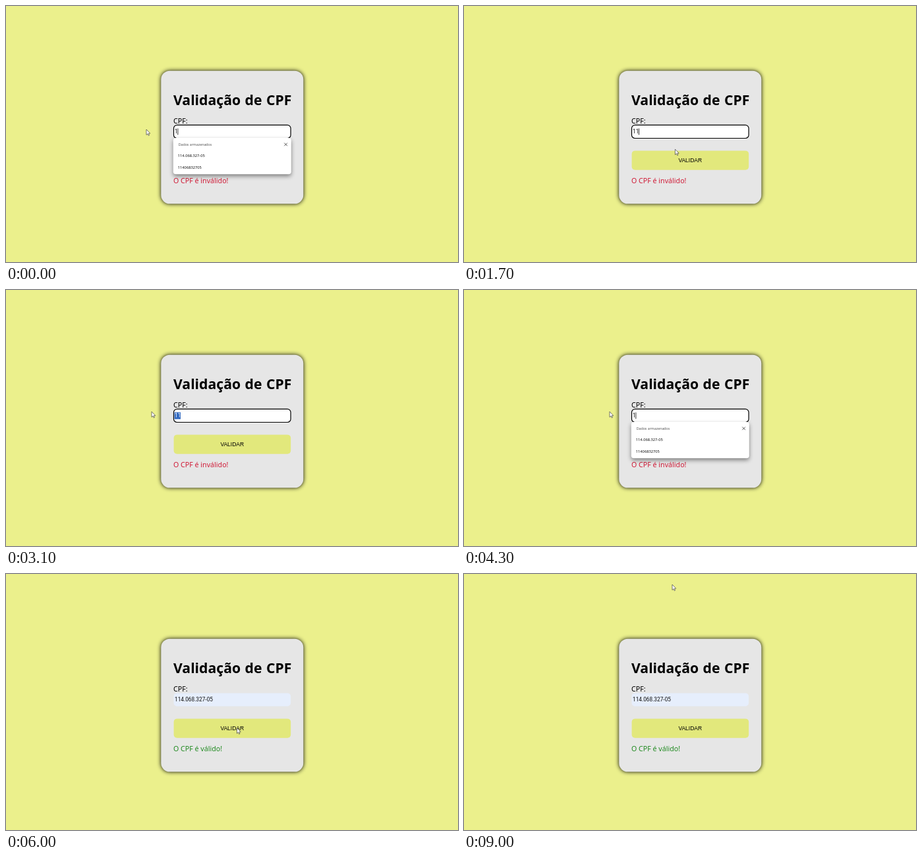
These frames come from a looping animation (686 px wide and 390 px high, 9.1 s). An HTML page:

```html
<!DOCTYPE html>
<html lang="pt-BR">
<head>
<meta charset="utf-8">
<title>Validação de CPF</title>
<style>
  html, body { margin: 0; width: 100%; height: 100%; overflow: hidden; background: #ebf08c; }
  svg { display: block; width: 686px; height: 390px; }
  text { font: 10.67px "Noto Sans", sans-serif; white-space: pre; }
  .title { font-size: 21.2px; font-weight: 600; word-spacing: 1px; }
  .button { font: 8.53px "Liberation Sans", Arial, sans-serif; text-anchor: middle; }
  .value { font: 8.3px Roboto, sans-serif; fill: #111; }
  .hint { font-size: 5.25px; fill: #555; }
  .option { font-size: 5.72px; fill: #111; }
  .card { fill: #e6e6e6; filter: drop-shadow(0 0 3.3px #000); }
  .popup { fill: #fff; filter: drop-shadow(0 3px 3.3px rgba(0, 0, 0, .45)); }
  .field { fill: #fff; stroke: #000; stroke-width: 1.2; }
  .field.filled { fill: #e6eefc; }
  .field.blurred { stroke: none; }
  .value.selected { fill: #fff; }
  .message { fill: #d01c38; }
  .message.valid { fill: #228b22; }
</style>
</head>
<body>
<svg viewBox="0 0 686 390">
  <rect class="card" x="235.3" y="98.7" width="216" height="202.6" rx="13.3"/>
  <text class="title" x="254" y="151">Validação de CPF</text>
  <text x="254" y="178.8">CPF:</text>

  <rect id="field" class="field" x="254.5" y="181.4" width="177.6" height="20.1" rx="5"/>
  <rect id="selection" x="255.6" y="186.3" width="9.4" height="10.4" fill="#3068c0"/>
  <text id="value" class="value" x="256" y="194.2"></text>
  <rect id="caret" y="186.5" width=".8" height="9.8"/>

  <rect x="254.6" y="220.4" width="177.6" height="29.4" rx="5" fill="#e2e87c"/>
  <text class="button" x="343.3" y="237.8">VALIDAR</text>
  <text id="message" class="message" x="254" y="269.8"></text>

  <g id="popup">
    <rect class="popup" x="253.8" y="201" width="179" height="55.2" rx="4"/>
    <text class="hint" x="261.7" y="213">Dados armazenados</text>
    <path d="M422.3 208.6l4.6 4.6m0-4.6l-4.6 4.6" stroke="#444" stroke-width=".9"/>
    <text class="option" x="260.8" y="230.4">114.068.327-05</text>
    <text class="option" x="260.8" y="247.6">11406832705</text>
  </g>

  <path id="arrow" d="M0 0V8.4L2 6.6 3.2 9.4 4.5 8.9 3.3 6.1H5.8Z" fill="#fff" stroke="#333" stroke-width=".65"/>
  <path id="beam" d="M-2-4H2M0-4V4M-2 4H2" stroke="#444" stroke-width=".8"/>
</svg>
<script>
  const LOOP = 9100, STEP = 100, KEY_GAP = 300, BLINK = 500;
  const CPF = '114.068.327-05';

  // Moments of the session, in ms
  const leave = 500, click = 2100, drag = 2500, select = 2900;
  const clear = 3600, retype = 4300, pick = 5400, submit = 5800;

  const el = id => document.getElementById(id);
  const show = (id, on) => { el(id).style.display = on ? '' : 'none'; };
  const within = (v, from, to) => v >= from && v < to;
  const clamp = (v, lo, hi) => Math.min(hi, Math.max(lo, v));

  const glide = (at, x, y, duration = 600) => ({ at, x, y, duration });
  const glides = [
    glide(0, 205.5, 185),
    glide(800, 318, 232),
    glide(1600, 326, 186.8),
    glide(drag, 221, 185.3),
    glide(retype + 100, 327.5, 218),
    glide(pick - 100, 350.5, 234.5),
    glide(6200, 417, 260),
    glide(6700, 314, 253),
    glide(7200, 316, 16, 1500)
  ];

  function pointerAt(t) {
    let x = 213, y = 188;
    for (const g of glides) {
      const k = 1 - (1 - clamp((t - g.at) / g.duration, 0, 1)) ** 2;
      x += (g.x - x) * k;
      y += (g.y - y) * k;
    }
    return [x, y];
  }

  function valueAt(t) {
    if (t >= pick) return CPF;
    const keys = 1 + Math.floor((t - (t < clear ? 0 : retype)) / KEY_GAP);
    return CPF.slice(0, clamp(keys, 0, 2));
  }

  function caretOn(t) {
    const last = Math.max(...[0, KEY_GAP, click, clear, retype, retype + KEY_GAP].filter(a => a <= t));
    return Math.floor((t - last) / BLINK) % 2 === 0;
  }

  function draw(t) {
    const focused = t < submit, selected = within(t, select, clear);
    const value = el('value');
    value.textContent = valueAt(t);
    value.classList.toggle('selected', selected);
    show('selection', selected);

    el('field').classList.toggle('filled', t >= pick);
    el('field').classList.toggle('blurred', !focused);
    show('caret', focused && !selected && caretOn(t));
    el('caret').setAttribute('x', 255.8 + value.getComputedTextLength());

    el('message').textContent = focused ? 'O CPF é inválido!' : 'O CPF é válido!';
    el('message').classList.toggle('valid', !focused);
    show('popup', t < leave || within(t, click, drag + STEP) || within(t, retype, pick));

    const [x, y] = pointerAt(t);
    const overText = within(x, 254, 432) && (within(y, 181, 201) || within(y, 130, 158));
    show('arrow', !overText);
    show('beam', overText);
    el(overText ? 'beam' : 'arrow').setAttribute('transform', `translate(${x} ${y})`);
  }

  const start = performance.now();
  function frame() {
    const t = (performance.now() - start) % LOOP;
    draw(Math.floor(t / STEP) * STEP);
    requestAnimationFrame(frame);
  }
  frame();
</script>
</body>
</html>
```
